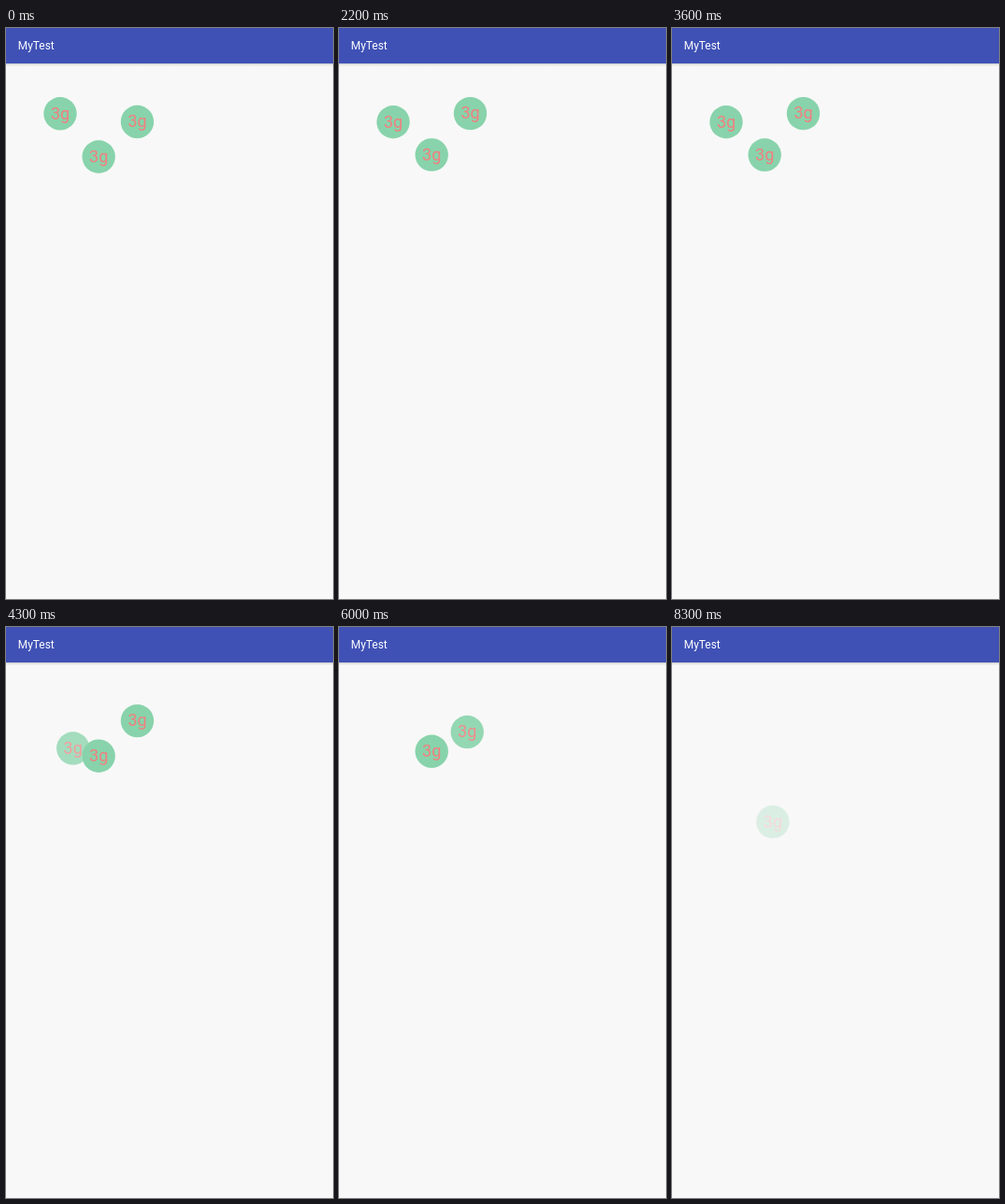
Write an HTML page that moves like this. It is 350 px wide and 612 px high and loops after 8400 ms.

```html
<!DOCTYPE html>
<html lang="en">
<head>
<meta charset="utf-8">
<title>MyTest</title>
<style>
  html, body { margin: 0; width: 100%; height: 100%; overflow: hidden; background: #f8f8f8; }
  svg { display: block; width: 350px; height: 612px; }
  text { font-family: Roboto, sans-serif; }
  .title { font-size: 11.9px; fill: #fff; }
  .ball circle { fill: #88d3ab; }
  .ball text { font-size: 18px; fill: #f08080; text-anchor: middle; }
</style>
</head>
<body>
<svg viewBox="0 0 350 612">
  <defs>
    <linearGradient id="shade" x2="0" y2="1">
      <stop stop-color="#000" stop-opacity=".16"/>
      <stop offset="1" stop-color="#000" stop-opacity="0"/>
    </linearGradient>
  </defs>
  <rect width="350" height="612" fill="#f8f8f8"/>
  <rect y="38" width="350" height="3" fill="url(#shade)"/>
  <rect width="350" height="38" fill="#3f51b5"/>
  <text class="title" x="12.8" y="23.2">MyTest</text>
  <g id="balls"></g>
</svg>
<script>
const LOOP = 8400, STEP = 100, FLIGHT = 1000, SWING = 5.2;
const GOAL = { x: 110.8, y: 232 };

// phase in cycles, rate in cycles per second, gain is how the rate grows.
const balls = [
  { x: 58, y: 95.6, phase: -0.068, rate: 0.714, gain: 0, takeOff: 4040 },
  { x: 99.2, y: 137.4, phase: -0.28, rate: 0.629, gain: 0.0155, takeOff: 7550 },
  { x: 140.5, y: 96.1, phase: -0.536, rate: 0.714, gain: 0, takeOff: 5890 }
];

const mix = (a, b, k) => a + (b - a) * k;

// Triangle wave: -1 at whole cycles, 1 halfway between.
const triangle = cycles => 4 * Math.abs(cycles - Math.round(cycles)) - 1;

function bob({ y, phase, rate, gain }, seconds) {
  return y + SWING * triangle(phase + rate * seconds + gain * seconds ** 2);
}

function make(name, attributes, parent) {
  const node = document.createElementNS("http://www.w3.org/2000/svg", name);
  for (const key in attributes) node.setAttribute(key, attributes[key]);
  return parent.appendChild(node);
}

for (const ball of balls) {
  ball.node = make("g", { class: "ball" }, document.getElementById("balls"));
  make("circle", { r: 17.7 }, ball.node);
  make("text", { y: 5.8 }, ball.node).textContent = "3g";
}

function draw(time) {
  for (const ball of balls) {
    const flown = Math.min(1, Math.max(0, (time - ball.takeOff) / FLIGHT));
    const height = bob(ball, Math.min(time, ball.takeOff) / 1000);
    const left = mix(ball.x, GOAL.x, flown);
    const top = mix(height, GOAL.y, flown);
    ball.node.setAttribute("transform", `translate(${left.toFixed(2)} ${top.toFixed(2)})`);
    ball.node.setAttribute("opacity", 1 - flown);
  }
}

const start = performance.now();
function tick() {
  const time = (performance.now() - start) % LOOP;
  draw(Math.floor(time / STEP) * STEP);
  requestAnimationFrame(tick);
}
tick();
</script>
</body>
</html>
```
